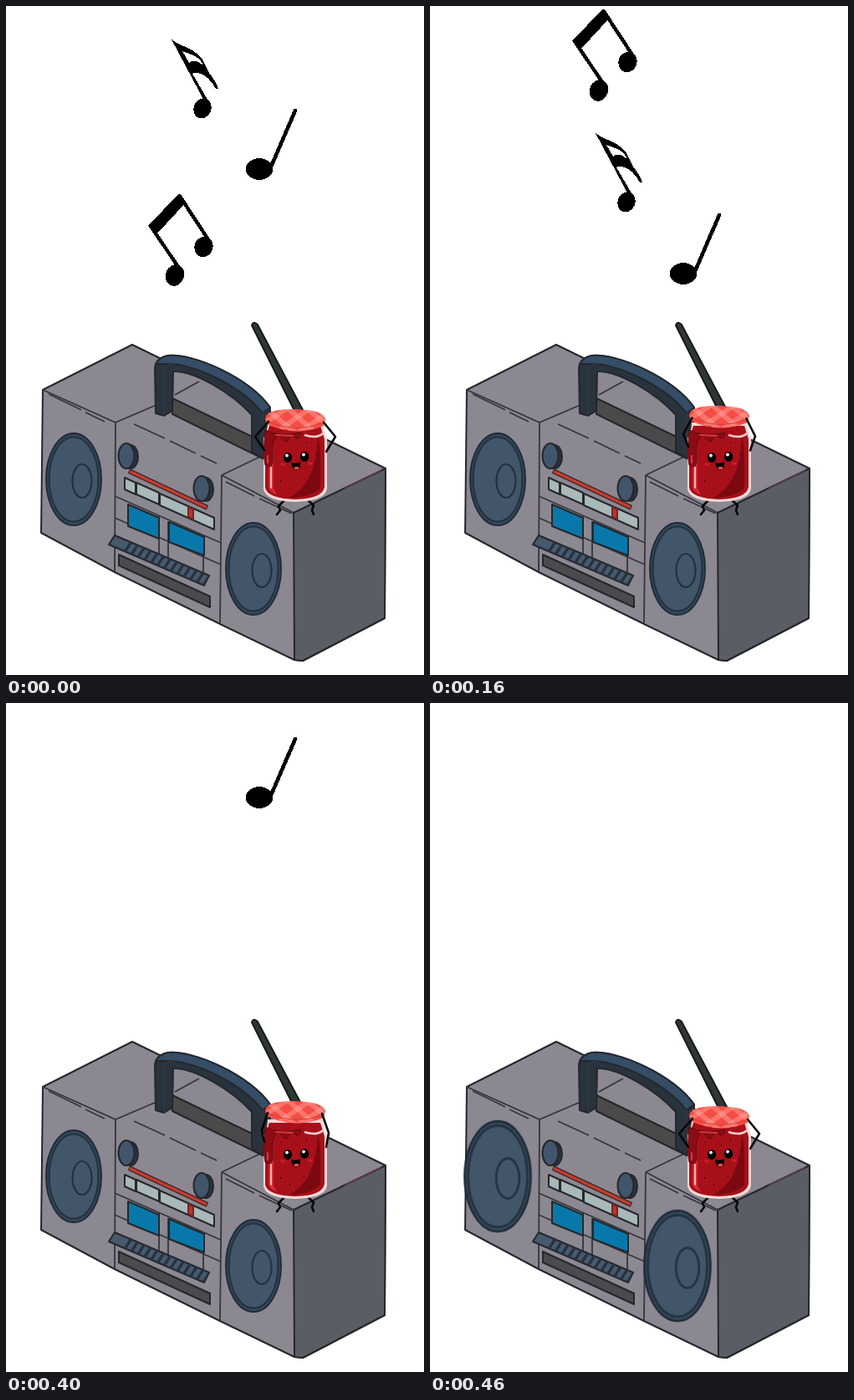
Write an HTML page that moves like this. It is 500 by 800 pixels and loops after 0.54 s.

```html
<!DOCTYPE html>
<html lang="en">
<head>
<meta charset="utf-8">
<title>Jam and music</title>
<style>
  html, body { margin: 0; width: 100%; height: 100%; overflow: hidden; background: #fff; }
  svg { display: block; width: 500px; height: 800px; }
  svg * { animation-duration: 540ms; animation-iteration-count: infinite; animation-timing-function: step-end; }
  .line { fill: none; stroke: #35353b; stroke-width: 1.8; }
  .edge { stroke: #25272c; stroke-width: 2; stroke-linejoin: round; }
  .limb { fill: none; stroke: #080808; stroke-width: 2.6; stroke-linejoin: round; stroke-linecap: round; }

  #notes { shape-rendering: crispEdges; }
  #sixteenth { animation-name: sixteenth; }
  #quarter { animation-name: quarter; }
  #beamed { animation-name: beamed; }
  #radio { animation-name: nudge; }
  #lid { animation-name: lift; }
  #leftArm { animation-name: leftArm; }
  #rightArm { animation-name: rightArm; }
  .speaker { animation-name: thump; transform-box: fill-box; transform-origin: center; }

  @keyframes sixteenth {
    0%, 44.44% { transform: none; }
    14.81% { transform: translateY(243px); }
    29.62% { transform: translateY(112px); }
    59.25% { transform: translate(-1px, -1px); }
    74.07%, 100% { transform: none; visibility: hidden; }
  }
  @keyframes quarter {
    0%, 44.44% { transform: none; }
    14.81%, 74.07% { transform: translateY(-82px); }
    29.62% { transform: translateY(125px); }
    59.25% { transform: translate(-1px, -1px); }
    77.77%, 100% { visibility: hidden; }
  }
  @keyframes beamed {
    0%, 44.44% { transform: none; }
    14.81% { transform: translateY(-98px); }
    29.62% { transform: translateY(-221px); }
    59.25%, 100% { visibility: hidden; }
  }
  @keyframes nudge {
    0%, 74.07%, 100% { transform: none; }
    59.25% { transform: translate(-1px, -1px); }
  }
  @keyframes thump {
    0% { transform: scale(1); }
    74.07% { transform: scale(1); animation-timing-function: steps(3, end); }
    85.18%, 100% { transform: scale(1.2); }
  }
  /* The lid rises in four steps, then drops quickly in four. */
  @keyframes lift {
    0% { transform: none; animation-timing-function: steps(4, end); }
    59.25% { transform: translateY(-8px); }
    74.07% { transform: translateY(-6px); animation-timing-function: steps(3, end); }
    85.18%, 100% { transform: none; }
  }
  @keyframes leftArm {
    0% { d: path("M309 531L298 515L314 497"); animation-timing-function: steps(4, end); }
    59.25% { d: path("M309 523L308 509L313 488"); }
    74.07% { d: path("M309 525L306 511L313 490"); animation-timing-function: steps(3, end); }
    85.18%, 100% { d: path("M309 531L298 515L314 497"); }
  }
  @keyframes rightArm {
    0% { d: path("M383 533L394 515L380 498"); animation-timing-function: steps(4, end); }
    59.25% { d: path("M383 530L384 514L377 489"); }
    74.07% { d: path("M383 531L386 514L378 491"); animation-timing-function: steps(3, end); }
    85.18%, 100% { d: path("M383 533L394 515L380 498"); }
  }
</style>
</head>
<body>
<svg viewBox="0 0 500 800">
  <defs>
    <g id="cone">
      <ellipse rx="33" ry="55" fill="#34475a" stroke="#202b37" stroke-width="2"/>
      <ellipse rx="29.5" ry="50.5" fill="#435569" stroke="#243240" stroke-width="2.2"/>
      <ellipse cx="10" cy="2" rx="11.5" ry="20" fill="#435569" stroke="#243240" stroke-width="2.2"/>
    </g>
    <g id="knob" class="edge">
      <ellipse cx="4" cy="1" rx="9" ry="14" fill="#263442"/>
      <ellipse cx="-1" rx="9.5" ry="15" fill="#42566b"/>
    </g>
    <clipPath id="keyClip"><path d="M130 633L243 681L237 693L123 644Z"/></clipPath>
    <clipPath id="lidClip"><path d="M310 493Q311 482 345 482Q380 483 382 494L380 502Q346 516 312 500Z"/></clipPath>
  </defs>

  <g id="notes">
    <g id="sixteenth">
      <path d="M198 40C206 47 222 50 231 59C238 66 239 74 243 80C248 86 252 93 254 99L251 99C246 90 239 82 230 80C227 79 225 80 223 81L244 117L240 119Z
               M211 54L219 68C224 63 231 66 236 72C233 60 221 58 211 54Z" fill-rule="evenodd"/>
      <ellipse cx="235" cy="122.5" rx="10.5" ry="12" transform="rotate(25 235 122.5)"/>
    </g>
    <g id="quarter">
      <ellipse cx="303" cy="195" rx="16.5" ry="12.8"/>
      <path d="M317.5 191L346 125" stroke="#000" stroke-width="4.6" stroke-linecap="round"/>
    </g>
    <g id="beamed">
      <path d="M207 224L215 235L181 272L170 263Z"/>
      <path d="M207 226L245 284M173 263L210 318" stroke="#000" stroke-width="4.4"/>
      <ellipse cx="236.5" cy="288" rx="11" ry="12.5" transform="rotate(22 236.5 288)"/>
      <ellipse cx="202" cy="322" rx="11" ry="13" transform="rotate(22 202 322)"/>
    </g>
  </g>

  <g id="radio">
    <path d="M294 382Q296 376 301 381L355 483L346 486Z" fill="#303635" stroke="#171a1a" stroke-width="2"/>
    <path class="edge" d="M151 405L454 553L453 732L355 783L345 782L258 740L130 677L42 630L44 459Z" fill="#8b8892"/>
    <path class="edge" d="M344 606L454 553L453 732L355 783L345 782Z" fill="#5b5d65"/>
    <path d="M405 577L449 555" stroke="#743d60" stroke-width="1.2"/>

    <g class="line">
      <path d="M44 459L131 498L180 477M131 498L130 676M258 561L256 738M258 561L344 606M258 561L308 537M202 465L231 449"/>
      <path d="M51 464L90 483M95 486L118 497M153 500L190 517M196 520L227 535M233 538L252 547M263 569L297 586M303 589L342 607"/>
    </g>

    <path class="edge" d="M199 469L309 522L307 541L199 488Z" fill="#4b4a4b"/>
    <path class="edge" d="M179 487L178 432Q181 420 194 418C224 415 290 444 316 480L316 512L308 541L294 533L294 489C270 463 226 436 200 437L199 484L189 490Z" fill="#28333e"/>
    <path class="edge" d="M179 428Q183 420 194 418C224 415 290 444 316 480L307 487C282 455 226 428 193 428Z" fill="#354d66"/>
    <path class="line" d="M189 489L189 435Q190 428 201 428M307 487L307 539"/>

    <use href="#knob" x="145" y="538"/>
    <use href="#knob" x="235" y="577"/>
    <path d="M147 556L241 600" stroke="#3a2929" stroke-width="6"/>
    <path d="M148 556.5L240 599.5" stroke="#c83b30" stroke-width="3.2"/>

    <g class="edge" fill="#a9b8b8">
      <path d="M142 564L155 570L155 584L142 578Z"/>
      <path d="M156 570L183 582L183 596L156 584Z"/>
      <path d="M184 583L249 612L249 626L184 597Z"/>
      <path d="M218 599L224 602L224 614L218 611Z" fill="#c33129" stroke="#742720"/>
    </g>

    <path class="line" d="M130 586L257 642M130 612L257 668M183 610L183 655M194 616L194 660M236 635L236 678"/>
    <path class="edge" d="M146 596L183 612L183 637L146 622ZM195 617L237 635L237 657L195 641Z" fill="#0878ab"/>

    <path class="edge" d="M130 633L243 681L237 693L123 644Z" fill="#46596d"/>
    <g clip-path="url(#keyClip)">
      <path d="M124 666L250 666" stroke="#26323e" stroke-width="80" stroke-dasharray="4 6" transform="translate(440 0) skewX(-33)"/>
    </g>
    <path class="edge" d="M135 656L244 706L244 719L135 669Z" fill="#4b4a4c"/>

    <g transform="translate(81 566)"><use class="speaker" href="#cone"/></g>
    <g transform="translate(296 673)"><use class="speaker" href="#cone"/></g>
  </g>

  <g id="jar">
    <path class="limb" d="M334 590L326 598L328 603L324 608M360 590L368 597L366 603L368 608"/>
    <path d="M313 498H379Q380 508 384 517L384 577Q382 592 346 593Q311 592 308 578L308 517Q313 508 313 498Z" fill="#f4d9d7"/>
    <path d="M315 502H376L381 518V575Q379 589 346 590Q313 589 310 576V518Z" fill="#a81019"/>
    <path d="M373 514Q377 524 376 576Q366 588 338 588Q371 573 373 514Z" fill="#7c0912"/>
    <path d="M315 520Q320 520 320 532V577L324 584Q315 582 314 574Z" fill="#d22b35"/>
    <path d="M317 552V576" stroke="#f0b6b5" stroke-width="2" stroke-linecap="round"/>
    <path d="M357 513Q372 518 379 511" fill="none" stroke="#f3cecb" stroke-width="2.5"/>
    <path d="M310 507Q328 516 353 510Q351 521 345 515Q339 513 337 520Q331 522 328 514Q321 512 319 526V546Q316 554 310 549L308 536Z" fill="#8b0c15" stroke="#610810"/>
    <path d="M313 538V546M323 513L343 514" stroke="#d33a40" stroke-width="2" stroke-linecap="round"/>
    <path d="M329 525h1M359 522h1M372 536h1M328 568h1M339 576h1M356 566h1M369 559h1M363 578h1M348 529h1" stroke="#3f050b" stroke-width="2"/>

    <g id="face">
      <ellipse cx="331" cy="548" rx="3" ry="1.8" fill="#c81f2a"/>
      <ellipse cx="364" cy="547" rx="3" ry="1.8" fill="#c81f2a"/>
      <ellipse cx="337" cy="540" rx="5.2" ry="6"/>
      <ellipse cx="357" cy="539" rx="5.2" ry="6"/>
      <g fill="#fff">
        <circle cx="336" cy="537.5" r="1.9"/><circle cx="356" cy="536.5" r="1.9"/>
      </g>
      <path d="M341 546Q347 548 352 545Q353 555 347 555Q342 554 341 546Z"/>
      <ellipse cx="347.5" cy="552.5" rx="3" ry="1.8" fill="#ef4b4b"/>
    </g>

    <g id="lid">
      <path d="M310 493Q311 482 345 482Q380 483 382 494L380 502Q346 516 312 500Z" fill="#f44d46"/>
      <g clip-path="url(#lidClip)" fill="none" stroke="#ffb3a8" stroke-opacity=".38" stroke-width="6">
        <path d="M310 498L338 480M328 506L366 480M350 510L386 486"/>
        <path d="M314 484L348 512M336 480L370 510M358 480L388 504"/>
      </g>
      <path d="M311 496Q345 512 381 498" fill="none" stroke="#d63a37" stroke-width="1"/>
    </g>
    <path id="leftArm" class="limb" d="M309 531L298 515L314 497"/>
    <path id="rightArm" class="limb" d="M383 533L394 515L380 498"/>
  </g>
</svg>
</body>
</html>
```
